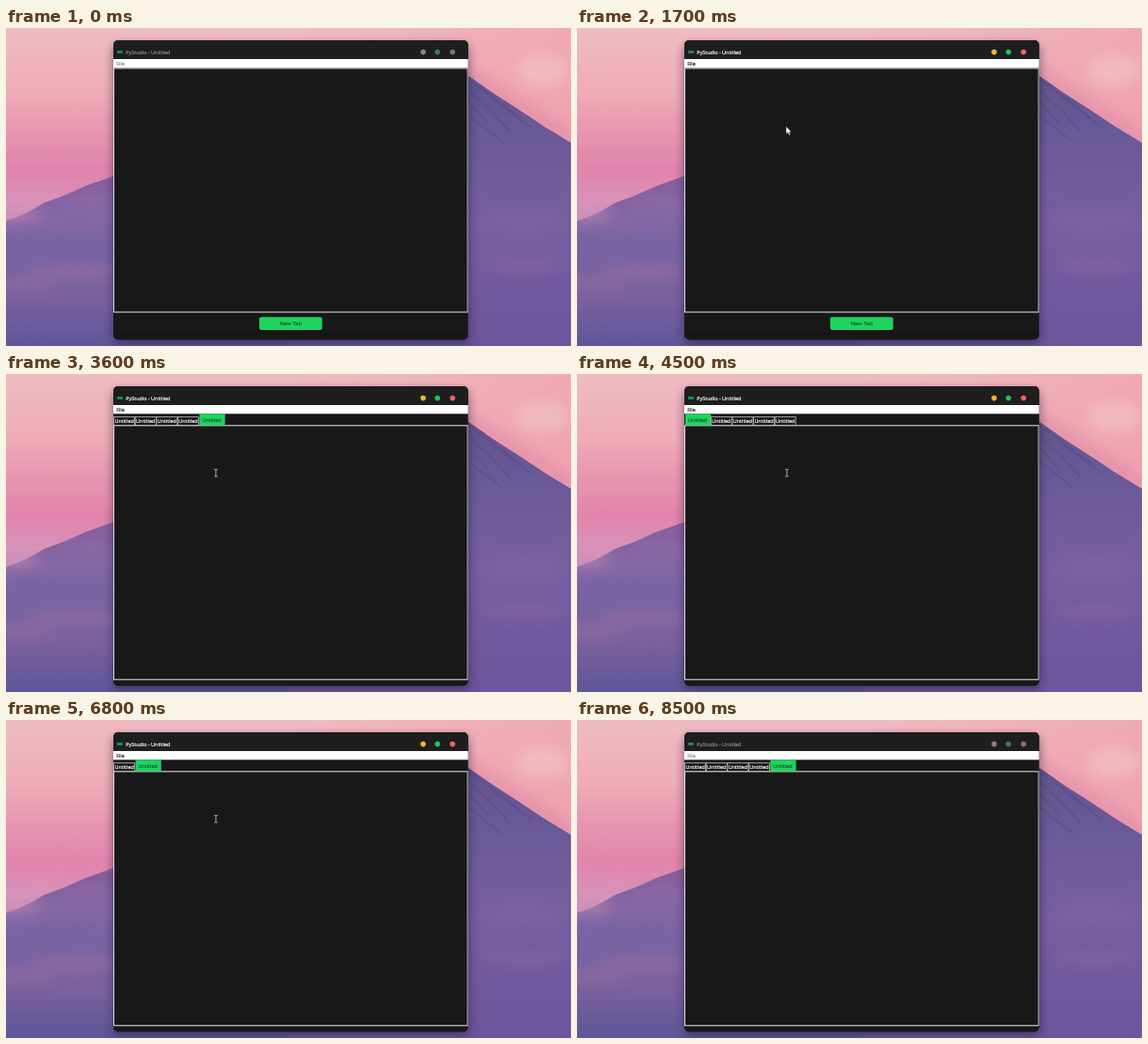
Recreate the animation shown at these times as an HTML page. Size 600 px wide and 338 px high, loop 8.6 s.

```html
<!DOCTYPE html>
<html lang="en">
<head>
<meta charset="utf-8">
<title>Tabbed editor</title>
<style>
  html, body { margin: 0; width: 100%; height: 100%; overflow: hidden; background: #9b6a9f; }
  svg { display: block; width: 100vw; height: 100vh; }
  text {
    font: 5.45px "Open Sans", "Noto Sans", sans-serif; white-space: pre;
    fill: currentColor; stroke: currentColor; stroke-width: .17;
  }
</style>
</head>
<body>
<svg viewBox="0 0 600 338" preserveAspectRatio="none">
  <defs>
    <linearGradient id="sky" x2="0" y2="1">
      <stop offset="0" stop-color="#efbcc3"/>
      <stop offset=".2" stop-color="#eeacb8"/>
      <stop offset=".33" stop-color="#e895b0"/>
      <stop offset=".45" stop-color="#e183ab"/>
      <stop offset=".55" stop-color="#d894ba"/>
      <stop offset=".65" stop-color="#b583b3"/>
    </linearGradient>
    <linearGradient id="warm">
      <stop offset="0" stop-color="#f0a3ae" stop-opacity="0"/>
      <stop offset="1" stop-color="#f0a3ae" stop-opacity=".75"/>
    </linearGradient>
    <linearGradient id="hill" x2="0" y2="1">
      <stop offset="0" stop-color="#875f9e"/>
      <stop offset=".25" stop-color="#8567a5"/>
      <stop offset=".5" stop-color="#7764a3"/>
      <stop offset=".7" stop-color="#7c619e"/>
      <stop offset="1" stop-color="#5e5699"/>
    </linearGradient>
    <linearGradient id="peak" x2="0" y2="1">
      <stop offset="0" stop-color="#62548f"/>
      <stop offset=".25" stop-color="#6b5a98"/>
      <stop offset=".55" stop-color="#765fa1"/>
      <stop offset="1" stop-color="#6b559b"/>
    </linearGradient>
    <filter id="soft" x="-50%" y="-150%" width="200%" height="400%"><feGaussianBlur stdDeviation="7"/></filter>
    <filter id="shade" x="-10%" y="-10%" width="120%" height="120%"><feGaussianBlur stdDeviation="5"/></filter>
    <clipPath id="frame"><rect x="114" y="13" width="376.7" height="318.5" rx="5"/></clipPath>
  </defs>

  <rect width="600" height="338" fill="url(#sky)"/>
  <rect x="300" width="300" height="200" fill="url(#warm)"/>
  <g filter="url(#soft)">
    <ellipse cx="570" cy="45" rx="28" ry="16" fill="#f3c2c6" opacity=".7"/>
    <path d="M490 38L600 110V128L490 60Z" fill="#e287a8" opacity=".6"/>
  </g>
  <path d="M0 205Q22 198 40 186L62 178 84 168 115 157H310V338H0Z" fill="url(#hill)"/>
  <path d="M300 50H490L517 69 545 87 572 105 600 122V338H300Z" fill="url(#peak)"/>
  <path d="M490 54L524 78 546 96M490 65L514 87 535 110M490 77L512 101M490 92L527 121M515 74L558 106"
        fill="none" stroke="#4f4684" stroke-width="1.2" opacity=".5"/>
  <g filter="url(#soft)">
    <ellipse cx="8" cy="198" rx="28" ry="6" fill="#d994ba" opacity=".6"/>
    <ellipse cx="90" cy="186" rx="28" ry="5" fill="#9a70aa" opacity=".5"/>
    <ellipse cx="55" cy="229" rx="65" ry="9" fill="#7063a4" opacity=".6"/>
    <ellipse cx="75" cy="259" rx="50" ry="7" fill="#a5709f" opacity=".55"/>
    <ellipse cx="15" cy="272" rx="38" ry="6" fill="#a2719f" opacity=".5"/>
    <ellipse cx="550" cy="253" rx="46" ry="6" fill="#936aa0" opacity=".5"/>
    <ellipse cx="550" cy="205" rx="45" ry="14" fill="#8165a4" opacity=".5"/>
  </g>

  <rect x="113" y="17" width="379" height="319" rx="7" fill="#251c3b" opacity=".5" filter="url(#shade)"/>
  <g clip-path="url(#frame)">
    <rect x="114" y="13" width="377" height="319" fill="#181818"/>
    <rect x="114" y="13" width="377" height="20" fill="#1e1e1e"/>
    <rect x="118" y="24" width="6" height="3" fill="#168a48"/>
    <text id="title" x="127.3" y="27.8">PyStudio - Untitled</text>
    <g id="lights">
      <circle cx="443" cy="25.6" r="2.8"/>
      <circle cx="458.2" cy="25.6" r="2.8"/>
      <circle cx="474.2" cy="25.6" r="2.8"/>
    </g>
    <rect x="114" y="33" width="377" height="9.3" fill="#fff"/>
    <text id="menu" x="117.2" y="39.7">File</text>
    <rect id="pane" x="114.5" width="375.7" fill="#181818" stroke="#d8d8d8" stroke-width="1.1"/>
    <g id="newTab">
      <rect x="269" y="307.2" width="66.7" height="13.8" rx="2" fill="#1ed35f"/>
      <text x="302.3" y="316.2" text-anchor="middle" color="#145a2d" style="font-size:5.9px">New Tab</text>
      <path d="M114 325.7H491" stroke="#111" stroke-width=".7"/>
    </g>
    <g id="tabs"></g>
  </g>
  <path id="arrow" d="M222 104.6V112.8L223.9 111 225.2 113.9 226.6 113.2 225.3 110.5H227.8Z"
        fill="#fff" stroke="#111" stroke-width=".4"/>
  <path id="beam" d="M221 101.4H222.3L222.9 102 223.5 101.4H224.8M222.9 102V108.4M221 109H222.3L222.9 108.4 223.5 109H224.8"
        fill="none" stroke="#d4d4d4" stroke-width=".8"/>
</svg>
<script>
const LOOP = 8600;
const FOCUS = 500, BLUR = 8300;
// [start ms, open tabs, selected tab]
const states = [
  [0, 0, 0], [1900, 1, 0],
  [2700, 2, 1], [2950, 3, 2], [3200, 4, 3], [3450, 5, 4],
  [4400, 5, 0], [5100, 4, 0], [5800, 3, 0], [6200, 2, 0], [6500, 2, 1],
  [7200, 3, 2], [7500, 4, 3], [7800, 5, 4]
];
const el = id => document.getElementById(id);
const show = (id, visible) => el(id).style.display = visible ? "" : "none";

function tabMarkup(x, selected) {
  const box = selected
    ? `<rect x="${x + .4}" y="42.3" width="27.2" height="12.2" fill="#1ed35f"/>`
    : `<rect x="${x}" y="45.7" width="22.1" height="8.8" fill="#181818" stroke="#c8c8c8" stroke-width=".8"/>`;
  const [dx, y, color] = selected ? [3.3, 51.2, "#145a2d"] : [0.9, 52.1, "#fff"];
  return `${box}<text x="${x + dx}" y="${y}" color="${color}">Untitled</text>`;
}

function drawTabs(count, selected) {
  let x = 114.6, markup = "";
  for (let i = 0; i < count; i++) {
    markup += tabMarkup(x, i === selected);
    x += i === selected ? 27.7 : 22.6;
  }
  el("tabs").innerHTML = markup;
  const top = count ? 54.8 : 42.9, bottom = count ? 324.8 : 302;
  el("pane").setAttribute("y", top);
  el("pane").setAttribute("height", bottom - top);
  show("newTab", !count);
}

function drawFocus(focused) {
  const colors = focused ? ["#f5b62d", "#20c45b", "#ee626e"] : ["#8b8180", "#397c50", "#896f73"];
  [...el("lights").children].forEach((dot, i) => dot.setAttribute("fill", colors[i]));
  el("title").setAttribute("color", focused ? "#fff" : "#8c8c8c");
  el("menu").setAttribute("color", focused ? "#222" : "#8b8b8b");
}

let shownState;
function render(now) {
  const t = now % LOOP;
  const state = states.findLast(([start]) => start <= t);
  const focused = t >= FOCUS && t < BLUR;
  if (state !== shownState) {
    drawTabs(state[1], state[2]);
    shownState = state;
  }
  drawFocus(focused);
  show("arrow", focused && !state[1]);
  show("beam", focused && state[1] > 0);
  requestAnimationFrame(render);
}
render(performance.now());
</script>
</body>
</html>
```
